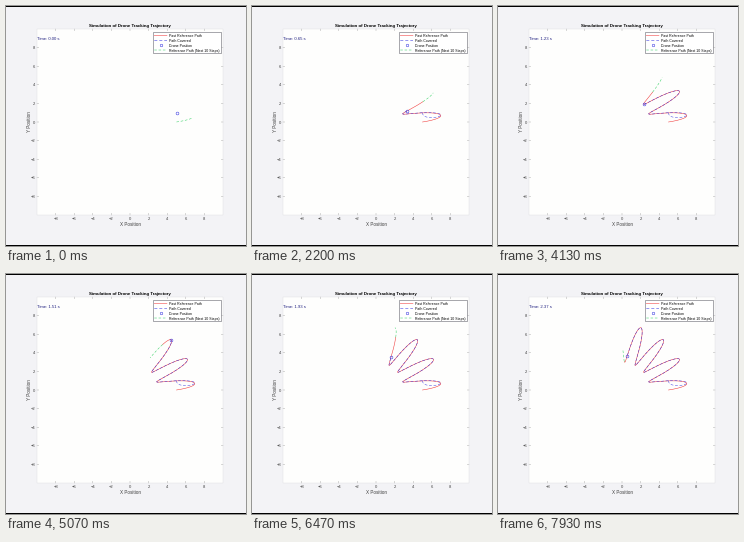
A matplotlib script for the animation above (8 s loop, 240x240 px).

```python
import numpy as np
import matplotlib.pyplot as plt
from matplotlib.animation import FuncAnimation
from matplotlib.patches import Rectangle

plt.rcParams["font.family"] = "Liberation Sans"

SIZE, DPI = 240, 100
LOOP, TICK, RATE = 8000, 20, 15    # ms, ms, pictures per second
PT = 72 / DPI                      # points per pixel
CX, CY, UNIT = 124, 116, 9.3
DT, LAG, HORIZON = 0.01, 0.11, 0.1
RED, BLUE, GREEN, INK = "#f03030", "#3030e0", "#30d060", "#404040"

fig = plt.figure(figsize=(SIZE / DPI, SIZE / DPI), dpi=DPI, facecolor="#f3f3f6")
ax = fig.add_axes([0, 0, 1, 1])
ax.set_xlim(0, SIZE)
ax.set_ylim(SIZE, 0)
ax.axis("off")


def reference(t):
    a = 2 * np.pi * t / 10
    r = 5 + 2 * np.sin(16 * a)
    return r * np.cos(a), r * np.sin(a)


def drone(t):
    x, y = reference(t - LAG * (1 - np.exp(-t / LAG)))
    return x, y + np.exp(-t / 0.1)


def to_px(xy):
    return CX + UNIT * xy[0], CY - UNIT * xy[1]


def label(x, y, s, px, ha="center", color=INK, **kw):
    return ax.text(x, y, s, fontsize=px * PT, ha=ha, color=color,
                   va=kw.pop("va", "center_baseline"), **kw)


def box(x, y, w, h, **kw):
    ax.add_patch(Rectangle((x, y), w, h, **kw))


def stroke(x, y, color, width=0.5, dash=None, z=3):
    style = (0, dash) if dash else "-"
    return ax.plot(x, y, color=color, lw=width * PT, ls=style, zorder=z,
                   dash_capstyle="butt", snap=False)[0]


def ring(x, y, size=2.8, z=6):
    return ax.plot(x, y, "o", ms=size * PT, mfc="none", mec=BLUE,
                   mew=0.5 * PT, zorder=z, snap=False)[0]


# plot frame, ticks and labels
x0, x1 = CX - 10 * UNIT, CX + 10 * UNIT
y0, y1 = CY - 10 * UNIT, CY + 10 * UNIT
box(x0, y0, x1 - x0, y1 - y0, fc="#fefefd", ec="#dcdce0", lw=0.4 * PT, zorder=1)
for v in range(-8, 9, 2):
    px, py = CX + v * UNIT, CY - v * UNIT
    for edge, d in ((y1, -1.8), (y0, 1.8)):
        stroke([px, px], [edge, edge + d], "#a0a0a0", 0.4)
    for edge, d in ((x0, 1.8), (x1, -1.8)):
        stroke([edge, edge + d], [py, py], "#a0a0a0", 0.4)
    tick = str(v).replace("-", "\u2212")
    label(px, 212.8, tick, 4.1)
    label(x0 - 2, py, tick, 4.1, "right")

label(CX, 19, "Simulation of Drone Tracking Trajectory", 4.4,
      color="black", weight="bold")
label(CX, 218, "X Position", 4.6)
label(23.3, CY, "Y Position", 4.6, rotation=90, va="center")
clock = label(x0 + 0.2, 32.3, "", 4.2, "left", color="#202080", zorder=5)

# legend
COVERED, AHEAD = (6, 4), (5, 3.6)
box(147, 25.5, 67.5, 21.5, fc="white", ec="#707078", lw=0.6 * PT, zorder=7)
rows = ["Past Reference Path", "Path Covered", "Drone Position",
        "Reference Path (Next 10 Steps)"]
for i, name in enumerate(rows):
    y = 29.4 + 4.87 * i
    label(162.6, y, name, 3.5, "left", color="black", zorder=9)
    if i == 2:
        ring(154.6, y, 2.6, 8)
    else:
        stroke([148.3, 161], [y, y], (RED, BLUE, None, GREEN)[i],
               dash=(None, COVERED, None, AHEAD)[i], z=8)

# dark edge rows
box(0, 0, SIZE, 1, fc="black", lw=0, zorder=10)
box(0, SIZE - 1, SIZE, 1, fc="black", lw=0, zorder=10)

past = stroke([], [], RED, z=3)
covered = stroke([], [], BLUE, 0.45, COVERED, z=4)
ahead = stroke([], [], GREEN, dash=AHEAD, z=4)
marker = ring([], [])


def update(i):
    # pictures advance 15 times a second, sampled near the middle of each tick
    shot = int((i * TICK + 14) * RATE / 1000)
    step = max(0, 2 * shot - 1)
    t = step * DT
    times = np.arange(step + 1) * DT
    past.set_data(*to_px(reference(times)))
    covered.set_data(*to_px(drone(times)))
    ahead.set_data(*to_px(reference(t + np.linspace(0, HORIZON, 11))))
    x, y = to_px(drone(t))
    marker.set_data([x], [y])
    clock.set_text(f"Time: {t:.2f} s")
    return past, covered, ahead, marker, clock


anim = FuncAnimation(fig, update, frames=LOOP // TICK, interval=TICK,
                     init_func=lambda: update(0), repeat=True, repeat_delay=0)
plt.show()
```
